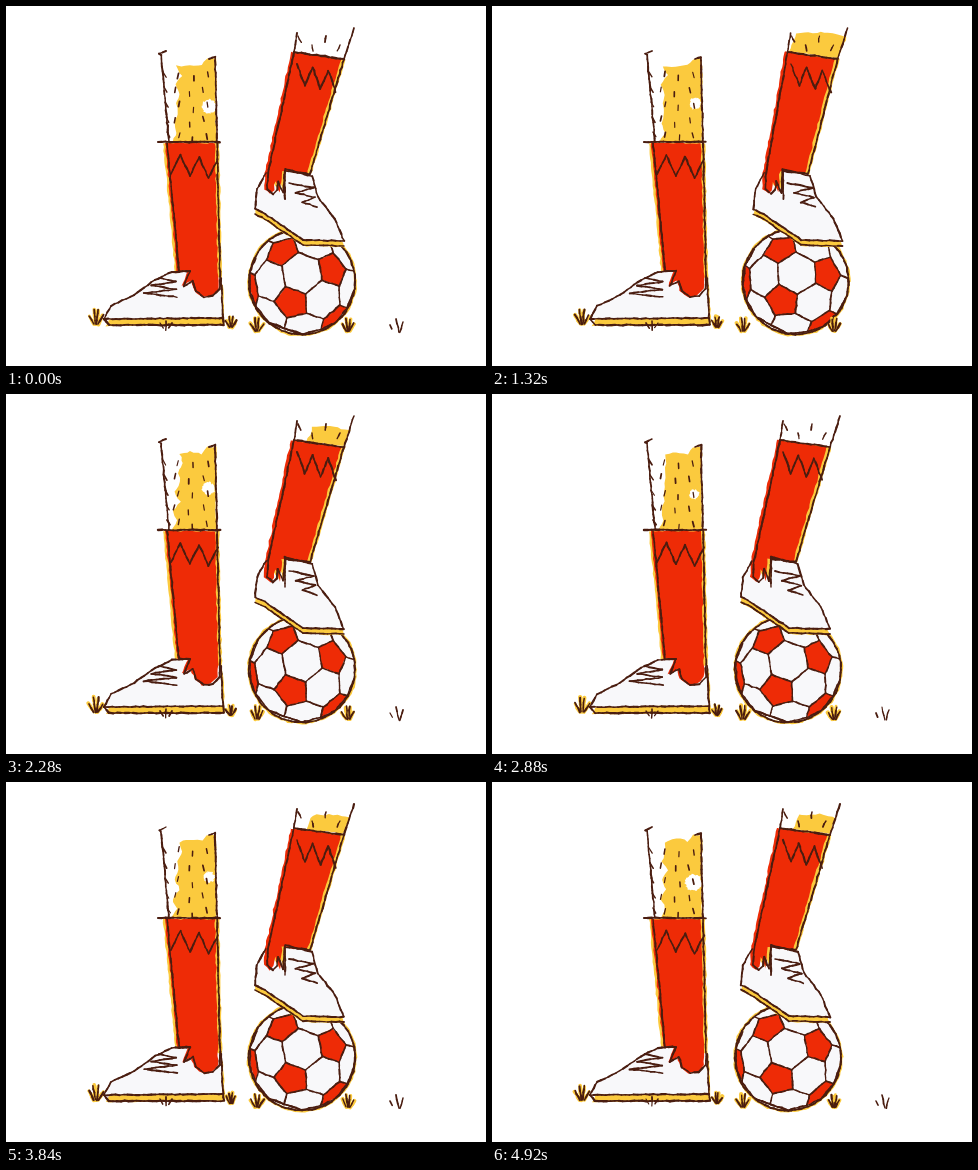
These frames come from a looping animation (480 by 360 pixels, 5.04 s). An HTML page with a canvas:

```html
<!DOCTYPE html>
<html lang="en">
<head>
<meta charset="utf-8">
<title>Foot on the ball</title>
<style>
  html, body { margin: 0; width: 100%; height: 100%; overflow: hidden; background: #fff; }
  canvas { display: block; width: 480px; height: 360px; }
</style>
</head>
<body>
<canvas id="stage" width="480" height="360"></canvas>
<script>
const ctx = document.getElementById('stage').getContext('2d');
const INK = '#4a1d10', RED = '#ee2b06', GOLD = '#fbca3e', WHITE = '#f8f8fa', PAPER = '#fff';
const STEP = 120, STEPS = 42, TAU = Math.PI * 2, DEG = Math.PI / 180;

let seed = 1;
function rand() {
  seed = (seed + 0x6D2B79F5) | 0;
  let v = Math.imul(seed ^ (seed >>> 15), 1 | seed);
  v = (v + Math.imul(v ^ (v >>> 7), 61 | v)) ^ v;
  return ((v ^ (v >>> 14)) >>> 0) / 4294967296;
}
const wob = a => (rand() - 0.5) * 2 * a;
const lerp = (a, b, u) => a + (b - a) * u;
const pts = s => s.split(' ').map(p => p.split(',').map(Number));
const shift = (points, dx, dy = 0) => points.map(([x, y]) => [x + dx, y + dy]);

// Key points of the drawing at rest.
const L_SOCK = pts('161,137 167,200 173,265 184,265 178,280 187,275 190,285 198,291 207,290 214,283 214,270 211,137');
const L_SHOE = pts('184,265 166,266 149,274 128,289 105,300 98,313 217,312 215,272');
const R_SOCK = pts('288,46 262,167 261,183 267,188 271,184 272,175 277,187 279,165 304,168 338,53');
const R_SHOE = pts('279,193 279,163 306,170 312,191 329,213 338,235 297,234 259,208 249,203 251,183 260,167');
const R_SKIN = pts('289,46 297,27 325,26 347,31 338,52');

function roughen(points, amount) {
  const out = [points[0]];
  for (let i = 1; i < points.length; i++) {
    const [ax, ay] = points[i - 1], [bx, by] = points[i];
    const n = Math.max(1, Math.round(Math.hypot(bx - ax, by - ay) / 4));
    for (let j = 1; j <= n; j++) {
      out.push([lerp(ax, bx, j / n) + wob(amount), lerp(ay, by, j / n) + wob(amount)]);
    }
  }
  return out;
}

function fill(points, color, amount = 0.6) {
  ctx.fillStyle = color;
  ctx.beginPath();
  roughen([...points, points[0]], amount).forEach(p => ctx.lineTo(p[0], p[1]));
  ctx.fill();
}

// Chalky line: each short piece has its own weight.
function line(points, width = 1.8, color = INK) {
  ctx.strokeStyle = color;
  ctx.lineCap = 'round';
  const path = roughen(points, 0.4);
  for (let i = 1; i < path.length; i++) {
    ctx.lineWidth = width * (0.75 + rand() * 0.5);
    ctx.beginPath();
    ctx.moveTo(...path[i - 1]);
    ctx.lineTo(...path[i]);
    ctx.stroke();
  }
}

function ring(x, y, r, wobble = 0) {
  return Array.from({ length: 49 }, (_, i) => {
    const q = r + wob(wobble);
    return [x + Math.cos(i / 48 * TAU) * q, y + Math.sin(i / 48 * TAU) * q];
  });
}

// Points from a to b, stepping aside by (dx, dy) at every second one.
function zigzag([ax, ay], [bx, by], n, dx, dy) {
  return Array.from({ length: n + 1 }, (_, i) =>
    [lerp(ax, bx, i / n) + (i % 2) * dx, lerp(ay, by, i / n) + (i % 2) * dy]);
}

function hair(x, y, lean, length = 5) {
  line([[x, y], [x + lean, y + length]], 1.5);
}

function tuft(x, y, size) {
  for (const color of [GOLD, INK]) {
    for (let i = -1.5; i <= 1.5; i++) {
      const height = (18 - Math.abs(i) * 6) * size;
      const top = [x + i * 5 * size + wob(0.8), y - height + wob(1)];
      line([top, [x + i * 1.5 * size, y]], color === GOLD ? 3.4 : 1.8, color);
    }
  }
}

function leftSkin() {
  const edge = zigzag([172, 60], [167, 136], 8, 4, 0).map(([x, y]) => [x + wob(2), y]);
  fill([[210, 136], [210, 53], [201, 53], [196, 60 + wob(2)], [184, 58 + wob(3)], ...edge], GOLD, 0.8);
  fill(ring(203 + wob(2), 98 + wob(5), 6.5 + wob(2), 0.8), PAPER);

  line(pts('160,45 153,48 155,49 163,136'), 1.7);
  line(pts('203,53 209,51 211,136'));
  for (let row = 0; row < 5; row++) {
    const y = 66 + row * 15;
    hair(157 + row, y, 3);
    for (let col = 0; col < 3; col++) {
      hair(173 + col * 14 - (row % 2) * 4 + wob(1), y + col * 4 % 7 + wob(1.5), col - 1);
    }
  }
}

function leftLeg() {
  leftSkin();
  fill(shift(L_SOCK, -4), GOLD);
  fill(shift(L_SOCK, 2), GOLD);
  fill(shift(L_SHOE, 2, 7), GOLD);
  fill(L_SHOE, WHITE);
  fill(shift(L_SOCK, -2), RED, 0.7);

  line(L_SHOE);
  line(L_SOCK);
  line(pts('152,136 214,136'), 2);
  line(zigzag([165, 168], [212, 173], 5, 0, -20));
  line(pts('98,313 103,319 218,319 217,312'), 2);
  line(zigzag([153, 272], [154, 291], 5, 5, 0).map(([x, y], i) => [x + (i % 2 ? 12 : -i * 4), y]), 1.7);
}

// Twelve corners of an icosahedron seen along a face; each becomes a pentagon.
const CORNERS = [];
for (const [polar, start] of [[37.38, 110], [79.19, 170], [100.81, 110], [142.62, 170]]) {
  for (let i = 0; i < 3; i++) {
    const p = polar * DEG, a = (start + 120 * i) * DEG;
    CORNERS.push([Math.sin(p) * Math.cos(a), Math.sin(p) * Math.sin(a), Math.cos(p)]);
  }
}
const dot = (a, b) => a[0] * b[0] + a[1] * b[1] + a[2] * b[2];
const TILT = 10 * DEG;

function drawBall(dx) {
  const x = 296 + dx, y = 275.5, r = 53, turn = dx / r;
  const project = p => {
    const size = Math.hypot(...p), [a, b, c] = p.map(v => v / size);
    const up = b * Math.cos(TILT) - c * Math.sin(TILT);
    const depth = b * Math.sin(TILT) + c * Math.cos(TILT);
    return [x + r * (a * Math.cos(turn) - up * Math.sin(turn)),
            y + r * (a * Math.sin(turn) + up * Math.cos(turn)), depth];
  };
  const between = (v, n, u) => project(v.map((c, i) => lerp(c, n[i], u)));

  fill(ring(x, y, r + 1.8, 0.5), GOLD);
  fill(ring(x, y, r - 0.5), WHITE);
  ctx.save();
  ctx.beginPath();
  ctx.arc(x, y, r, 0, TAU);
  ctx.clip();
  for (const v of CORNERS) {
    const [cx, cy, depth] = project(v);
    if (depth < -0.15) continue;
    const near = CORNERS.filter(n => n !== v && dot(n, v) > 0.4);
    const angle = p => Math.atan2(p[1] - cy, p[0] - cx);
    const panel = near.map(n => between(v, n, 1 / 3)).sort((p, q) => angle(p) - angle(q));
    fill(panel, RED);
    line([...panel, panel[0]], 1.6);
    for (const n of near) {
      const a = between(v, n, 1 / 3), b = between(v, n, 2 / 3);
      if (a[2] > 0 && CORNERS.indexOf(n) > CORNERS.indexOf(v)) line([a, b], 1.6);
    }
  }
  ctx.restore();
  line(ring(x, y, r), 1.9);
}

function rightLeg(k, knee, foot) {
  // The leg leans: the knee travels less than the foot.
  const pose = points => points.map(([x, y]) =>
    [x + lerp(knee, foot, Math.min(1, Math.max(0, (y - 50) / 130))), y]);
  const sock = pose(R_SOCK), shoe = pose(R_SHOE);

  const cover = foot > 4 ? 1 : 0.75;
  if (k % 24 > 1) fill(pose(R_SKIN).map(([x, y]) => [lerp(335 + knee, x, cover), lerp(52, y, cover)]), GOLD, 0.9);
  line(pose(pts('291,27 288,46')), 1.6);
  line(pose(pts('348,22 338,53')));
  for (let i = 0; i < 4; i++) hair(292 + i * 14 + knee, 30 + (i % 2) * 9, 3 - i * 2, 6);

  fill(shift(sock, 1.5), GOLD);
  fill(shift(shoe, 0, 6), GOLD);
  fill(shoe, WHITE);
  fill(shift(sock, -3), RED, 0.7);

  line(sock);
  line(shoe);
  line([sock[0], sock[sock.length - 1]], 2);
  line(pose(zigzag([291, 58], [330, 66], 5, 0, 20)));
  line(shift(shoe.slice(5, 9), 0, 5), 1.6);
  line(pose(zigzag([283, 177], [287, 201], 5, 24, 0).map(([x, y], i) => [x + (i % 2 ? 0 : i * 2.5), y])), 1.7);
}

// One quick roll out and back.
function footTravel(k) {
  const u = (k - 13.25) / 3.3;
  return Math.abs(u) < 1 ? 54 * Math.cos(u * Math.PI / 2) ** 2 : 0;
}

function draw(k) {
  seed = 977 * k + 31;
  const foot = footTravel(k), knee = foot * 0.61;
  ctx.fillStyle = PAPER;
  ctx.fillRect(0, 0, 480, 360);

  tuft(90, 318, 0.95);
  tuft(225, 321, 0.65);
  leftLeg();
  for (let i = -1; i <= 1; i++) hair(160 + i * 6, 315 + Math.abs(i) * 2, -i * 3, 9 - Math.abs(i) * 4);

  drawBall(knee);
  rightLeg(k, knee, foot);
  tuft(251, 325, 0.85);
  tuft(342, 325, 0.8);
  if (!foot) {
    hair(384, 319, 2, 4);
    hair(390, 313, 3, 13);
    hair(397, 316, -3, 10);
  }
}

let shown = -1;
const begin = performance.now();
function loop() {
  const t = Math.max(0, performance.now() - begin) % (STEP * STEPS);
  const k = Math.max(1, Math.floor(t / STEP)); // the first pose holds for two steps
  if (k !== shown) draw(shown = k);
  requestAnimationFrame(loop);
}
loop();
</script>
</body>
</html>
```
